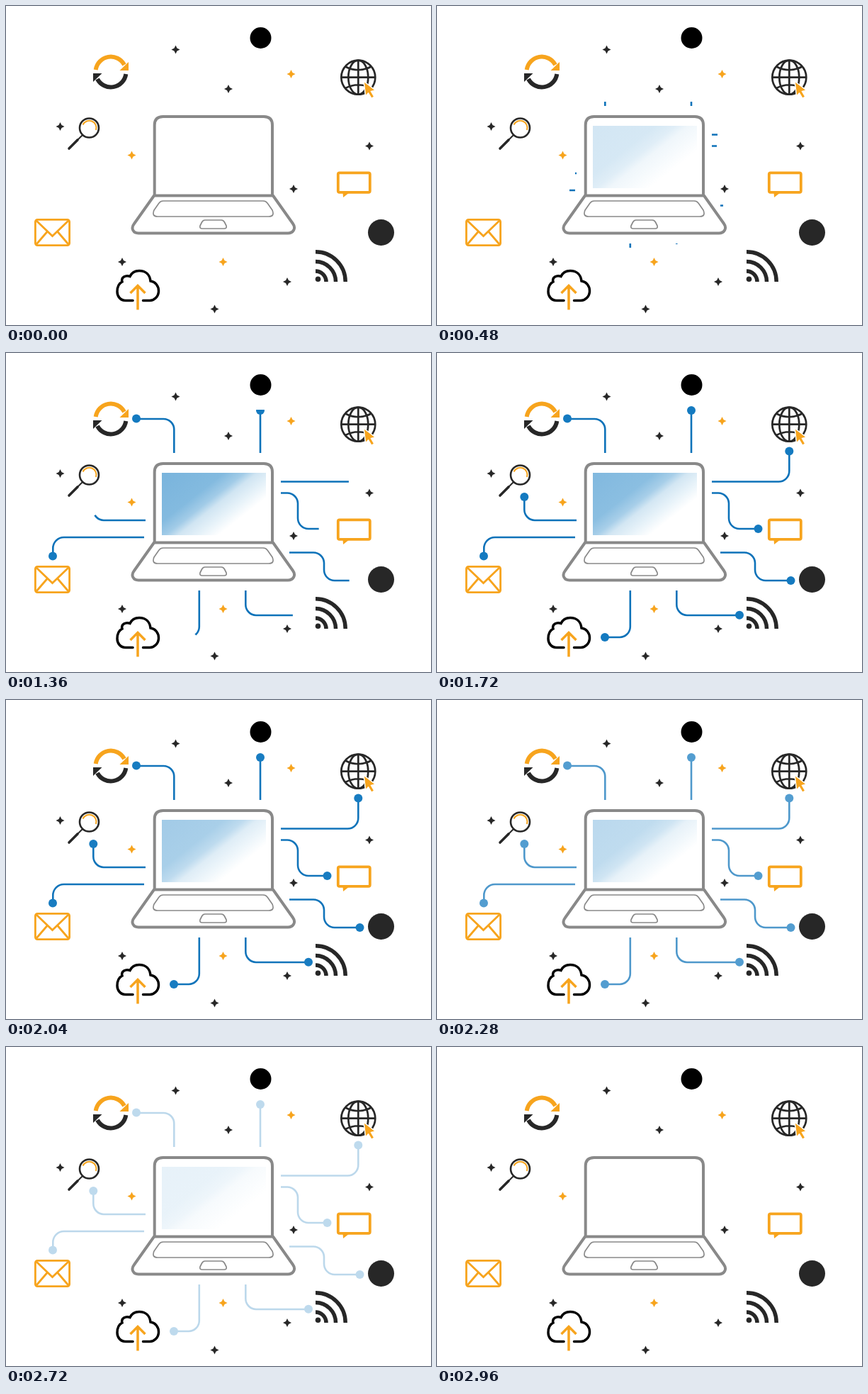
These frames come from a looping animation (600x450 px, 3000 ms). An HTML page:

```html
<!DOCTYPE html>
<html lang="en">
<head>
<meta charset="utf-8">
<title>Connected laptop</title>
<style>
  html, body { margin: 0; width: 100%; height: 100%; overflow: hidden; background: #fff; }
  svg { display: block; width: 600px; height: 450px; }
  .ink { stroke: #272727; }
  .black { stroke: #000; }
  .amber { stroke: #f7a41d; }
  .inkFill { fill: #272727; }
  .amberFill { fill: #f7a41d; }
</style>
</head>
<body>
<svg viewBox="0 0 600 450" fill="none">
  <defs>
    <linearGradient id="glow" gradientUnits="userSpaceOnUse" x1="220" y1="169" x2="319" y2="295">
      <stop offset="0" stop-color="#6bacd9"/>
      <stop offset=".34" stop-color="#76b3dc"/>
      <stop offset=".45" stop-color="#98c6e5"/>
      <stop offset=".52" stop-color="#cbe2f1"/>
      <stop offset=".64" stop-color="#e6f2f9"/>
      <stop offset=".74" stop-color="#fff"/>
    </linearGradient>
    <path id="star" d="M0-6L2-2 6 0 2 2 0 6-2 2-6 0-2-2Z"/>
    <g id="swirl">
      <path d="M126.700 90A21.500 21.500 0 0 1 167 83" fill="none" stroke-width="6"/>
      <path d="M173 79V91H160.500Z" stroke="none"/>
    </g>
  </defs>

  <rect id="screen" x="220" y="169" width="147" height="88" fill="url(#glow)"/>
  <g id="links" stroke="#0d72b9" stroke-width="2.6"></g>

  <!-- laptop -->
  <g stroke="#898989" stroke-width="4" stroke-linejoin="round">
    <path d="M209.700 267V168Q209.700 156 221.700 156H364Q376 156 376 168V267"/>
    <path d="M209 267.500H377L405 307C410 314 405 320.500 398 320.500H187C180 320.500 175.500 314 181 307Z"/>
    <g stroke-width="1.700">
      <path d="M222 275H363Q367 275 369 278L376 288Q379.500 297 371 297H214Q205.500 297 209 288L216 278Q218 275 222 275Z"/>
      <path d="M281 302H304Q307 302 308.500 305L311 310Q312 314 308 314H277Q273 314 274 310L276.500 305Q278 302 281 302Z"/>
    </g>
  </g>

  <!-- refresh -->
  <use href="#swirl" class="amber amberFill"/>
  <use href="#swirl" class="ink inkFill" transform="rotate(180 148 93)"/>

  <!-- magnifier -->
  <circle class="ink" cx="117.500" cy="172" r="13.500" stroke-width="2.600"/>
  <path class="amber" d="M108.500 167.500A10 10 0 0 1 127 175" stroke-width="2"/>
  <path class="ink" d="M108 182L100 190" stroke-width="2"/>
  <path class="ink" d="M101 189L89 201" stroke-width="3.600" stroke-linecap="round"/>

  <!-- envelope -->
  <g class="amber" stroke-width="2.800">
    <rect x="41.400" y="301.400" width="48.200" height="36.200" rx="3"/>
    <path d="M43 303L65.500 324.500 88 303M43 336L58.500 318M88 336L72.500 318"/>
  </g>

  <!-- cloud -->
  <path class="black" stroke-width="3.500" stroke-linecap="round" d="M179 415.500H169C161 415.500 157 409 157 403C157 396 160 391 164 389C162 383 169 379 175 381.500C178 375 183 373.500 188 373.500C197 373.500 203 379 204 388C211 389 215.500 395 215.500 402C215.500 410 209 415.500 203 415.500H193.500"/>
  <path class="amber" stroke-width="3.500" d="M186 428.500V394M175.500 405L186 394.500 196.500 405"/>

  <!-- globe -->
  <g class="ink" stroke-width="2.700">
    <circle cx="497.300" cy="100.700" r="24"/>
    <ellipse cx="497.300" cy="100.700" rx="14" ry="24"/>
    <path d="M497.300 77V125M473 100.700H521M479 85.500Q497.300 95 515.500 85.500M479 116Q497.300 106.500 515.500 116"/>
  </g>
  <path class="amberFill" stroke="#fff" stroke-width="1.500" d="M505 106L521.500 119 515.500 120.500 520 128 516 130.500 511.500 123 507.500 127Z"/>

  <!-- speech bubble -->
  <rect class="amber" x="468.800" y="235.300" width="45" height="27.500" rx="2" stroke-width="3.800"/>
  <path class="amberFill" d="M475.500 263H485L476 270Z"/>

  <!-- feed -->
  <g class="ink" stroke-width="5.500">
    <path d="M437 346.800A42.200 42.200 0 0 1 479.200 389M437 360.500A28.500 28.500 0 0 1 465.500 389M437 374A15 15 0 0 1 452 389"/>
  </g>
  <circle class="inkFill" cx="440.500" cy="385.300" r="3.800"/>

  <!-- plain badges -->
  <circle cx="359.500" cy="45" r="15" fill="#000"/>
  <circle class="inkFill" cx="529.500" cy="319.500" r="18.500"/>

  <g id="darkStars" class="inkFill"></g>
  <g id="amberStars" class="amberFill"></g>
</svg>
<script>
const LOOP = 3000, STEP = 40;
const $ = id => document.getElementById(id);

function add(parent, tag, attrs) {
  const el = document.createElementNS('http://www.w3.org/2000/svg', tag);
  for (const key in attrs) el.setAttribute(key, attrs[key]);
  return parent.appendChild(el);
}

function addStars(parent, points) {
  for (const [x, y] of points) add(parent, 'use', { href: '#star', x, y });
}
addStars($('darkStars'), [[239.5, 61.5], [314, 117], [76.5, 170], [513, 197.5],
  [406, 258], [164, 361], [397, 389], [294.5, 427.5]]);
addStars($('amberStars'), [[402.5, 96], [177.5, 210.5], [306.5, 361]]);

// Each link: route, dot centre, run past the dot, revealed length at each time.
const TIMES = [400, 480, 1000, 1120, 1360, 1640];
const LINKS = [
  ['M237.300 141V108A15 15 0 0 0 222 93H184', 184, 92.5, 'h-7', [6, 39, 65, 120]],
  ['M359 141V81', 359, 81, 'v-7', [6, 39, 57, 61]],
  ['M388 181.500H482A15 15 0 0 0 497.300 166V138', 497.3, 138.5, 'v-7', [8, 61, 92, 96]],
  ['M388 197.500H397A15 15 0 0 1 412 212V233A15 15 0 0 0 427 248H453', 453.5, 248, 'h7', [7, 70, 82, 91]],
  ['M400 281.500H434A15 15 0 0 1 449 296V306A15 15 0 0 0 464 321H499', 499.5, 321, 'h7', [4, 81, 100, 111]],
  ['M338.300 335V355A15 15 0 0 0 353 370H427', 427, 369.7, 'h7', [1, 62, 80, 95]],
  ['M272.800 335V386A15 15 0 0 1 258 401H237', 237, 401, 'h-7', [6, 44, 55, 64]],
  ['M195 260H82A15.500 15.500 0 0 0 66.300 276V287', 66, 286.5, 'v7', [8, 77, 131, 170]],
  ['M197 236H138A15 15 0 0 1 123.300 221V203', 123.3, 203, 'v-7', [2, 37, 60, 74]]
].map(([d, cx, cy, tail, lengths], i) => {
  const mask = add(document.querySelector('defs'), 'mask',
    { id: 'reveal' + i, maskUnits: 'userSpaceOnUse', x: 0, y: 0, width: 600, height: 450 });
  const wipe = add(mask, 'path', { d: d + tail, stroke: '#fff', 'stroke-width': 14 });
  const group = add($('links'), 'g', { mask: `url(#reveal${i})` });
  add(group, 'path', { d });
  add(group, 'circle', { cx, cy, r: 6, fill: '#147ac0', stroke: 'none' });
  const end = wipe.getTotalLength() + 2;
  return { wipe, lengths: [0, ...lengths, end] };
});

const clamp = v => Math.max(0, Math.min(1, v));

function along(values, t) {
  let i = 0;
  while (i < TIMES.length - 2 && t > TIMES[i + 1]) i++;
  const k = clamp((t - TIMES[i]) / (TIMES[i + 1] - TIMES[i]));
  return values[i] + (values[i + 1] - values[i]) * k;
}

function draw(time) {
  const t = Math.floor(time % LOOP / STEP) * STEP;
  $('screen').setAttribute('opacity', clamp(1 - Math.abs(t - 1500) / 1460));
  $('links').setAttribute('opacity', t < 400 || t >= 2960 ? 0 : clamp((2980 - t) / 960));
  for (const { wipe, lengths } of LINKS)
    wipe.setAttribute('stroke-dasharray', along(lengths, t) + ' 999');
}

const start = performance.now();
function tick() {
  draw(performance.now() - start);
  requestAnimationFrame(tick);
}
tick();
</script>
</body>
</html>
```
